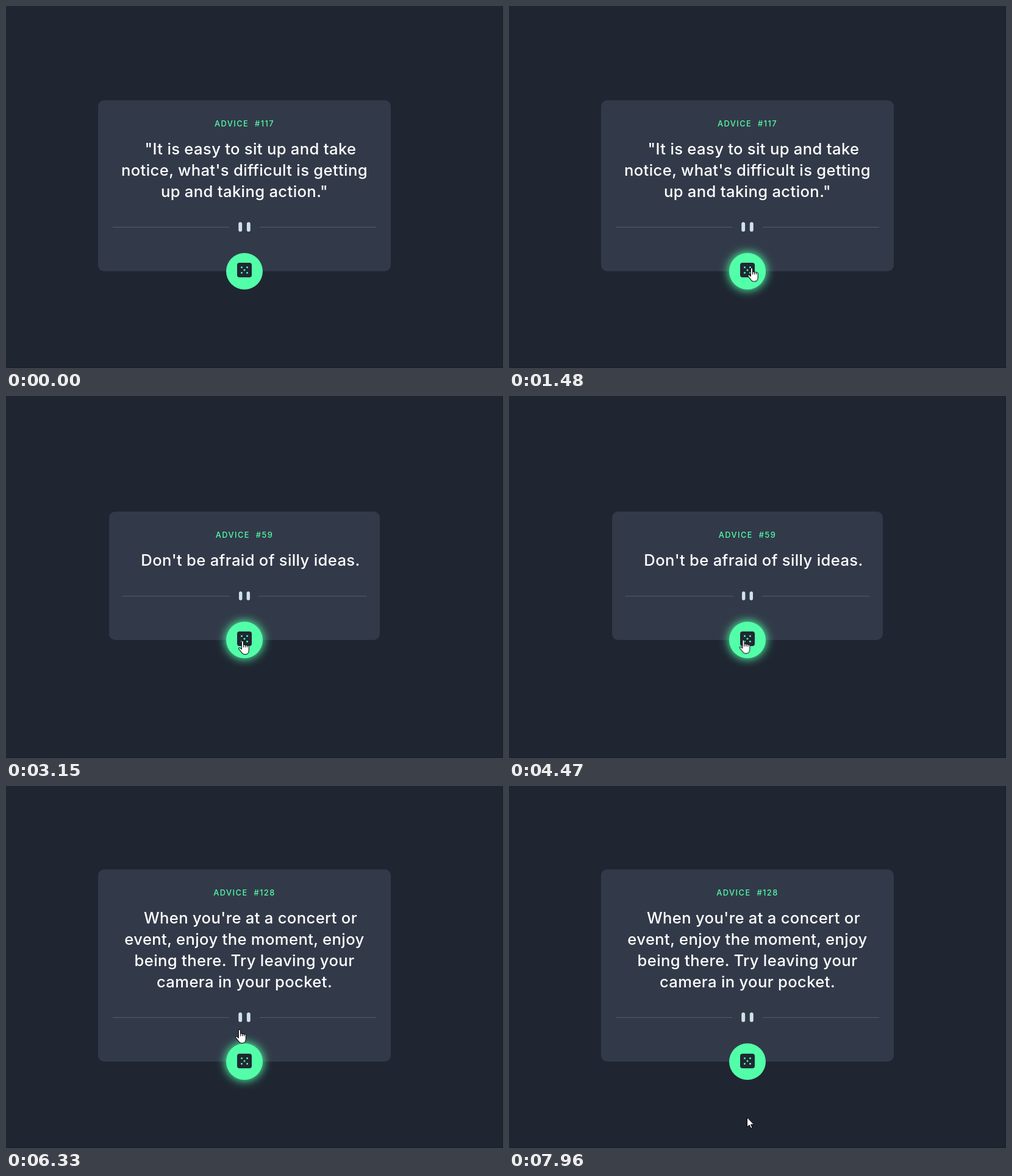
These frames come from a looping animation (815x595 px, 8 s). An HTML page:

```html
<!DOCTYPE html>
<html lang="en">
<head>
<meta charset="utf-8">
<title>Advice generator</title>
<style>
  html, body { margin: 0; width: 100%; height: 100%; overflow: hidden; background: #1f2632; }
  svg { display: block; width: 815px; height: 595px; }
  text { font-family: Inter, "Open Sans", sans-serif; text-anchor: middle; white-space: pre; }
  .title { font-size: 12.8px; font-weight: 500; letter-spacing: 1.45px; word-spacing: 5px; fill: #52ffa8; }
  .quote { font-size: 25.6px; font-weight: 500; letter-spacing: .4px; word-spacing: -.3px; fill: #fff; }
  .panel { fill: #323a49; }

  .card, .btn, .dice, .glow, .click, .arrow, .hand { animation: 8s step-end infinite; }
  .one { animation-name: one; }
  .two { animation-name: two; }
  .three { animation-name: three; }
  .btn { animation-name: btn; }
  .dice { animation-name: dice; }
  .glow { animation-name: hover; fill: #52ffa8; filter: blur(7.5px); }
  .hand { animation-name: hover; }
  .arrow { animation-name: arrow; }
  .click { animation-name: click; fill: #ff0; fill-opacity: .47; }
  .cursor { animation: move 8s linear infinite; }
  .arrow, .hand { fill: #fff; stroke: #000; stroke-linejoin: round; }

  @keyframes one { 0% { visibility: visible } 26.625%, 100% { visibility: hidden } }
  @keyframes two { 0% { visibility: hidden } 26.625% { visibility: visible } 79.125%, 100% { visibility: hidden } }
  @keyframes three { 0% { visibility: hidden } 79.125%, 100% { visibility: visible } }
  @keyframes btn {
    0% { transform: translate(391px, 436px) }
    26.625% { transform: translate(391px, 401px) }
    79.125%, 100% { transform: translate(391px, 453px) }
  }
  @keyframes dice {
    0% { transform: translate(-12px, -14px) }
    79.125%, 100% { transform: translate(-12px, -13px) }
  }
  @keyframes hover { 0% { opacity: 0 } 13.39% { opacity: 1 } 85.75%, 100% { opacity: 0 } }
  @keyframes arrow { 0% { opacity: 1 } 13.39% { opacity: 0 } 85.75%, 100% { opacity: 1 } }
  @keyframes click {
    0%, 18.5%, 44.25%, 73.125%, 100% { opacity: 0 }
    16.75%, 42.625%, 71.5% { opacity: 1 }
  }
  @keyframes move {
    0%, 6.5% { transform: translate(692px, 597px); animation-timing-function: steps(6, start) }
    11.67% { transform: translate(463px, 535px); animation-timing-function: steps(2, start) }
    13.39% { transform: translate(406px, 477px); animation-timing-function: steps(2, start) }
    15.11%, 35.75% { transform: translate(398px, 431px); animation-timing-function: steps(5, start) }
    40.28%, 51.75% { transform: translate(388px, 403px); animation-timing-function: steps(2, start) }
    55%, 55.875% { transform: translate(386px, 402px); animation-timing-function: steps(2, start) }
    59.125%, 85.75% { transform: translate(383px, 401px); animation-timing-function: steps(4, start) }
    89.16% { transform: translate(247px, 399px); animation-timing-function: steps(2, start) }
    90.86% { transform: translate(186px, 430px); animation-timing-function: steps(6, start) }
    96% { transform: translate(234px, 522px); animation-timing-function: steps(5, start) }
    100% { transform: translate(390px, 544px) }
  }
</style>
</head>
<body>
<svg viewBox="0 0 815 595">
  <defs>
    <g id="divider">
      <path fill="#4f5d74" d="M0 8h196v1H0zM248 8h196v1H248z"/>
      <g fill="#cee3e9">
        <rect x="212" width="6" height="16" rx="3"/>
        <rect x="226" width="6" height="16" rx="3"/>
      </g>
    </g>
  </defs>
  <path d="M814.5 0V594.5H0" fill="none" stroke="#191f2a"/>

  <g class="card one">
    <rect class="panel" x="151" y="155" width="480" height="281" rx="10"/>
    <text class="title" x="391" y="198">ADVICE #117</text>
    <g class="quote">
      <text x="401" y="244">"It is easy to sit up and take</text>
      <text x="391" y="279">notice, what's difficult is getting</text>
      <text x="391" y="314">up and taking action."</text>
    </g>
    <use href="#divider" transform="translate(175 355.3) scale(.973)"/>
  </g>

  <g class="card two">
    <rect class="panel" x="169" y="190" width="444" height="211" rx="10"/>
    <text class="title" x="391" y="233">ADVICE #59</text>
    <text class="quote" x="401" y="279">Don't be afraid of silly ideas.</text>
    <use href="#divider" transform="translate(191 321.3) scale(.901)"/>
  </g>

  <g class="card three">
    <rect class="panel" x="151" y="137" width="480" height="316" rx="10"/>
    <text class="title" x="391" y="180">ADVICE #128</text>
    <g class="quote">
      <text x="401" y="226">When you're at a concert or</text>
      <text x="391" y="261">event, enjoy the moment, enjoy</text>
      <text x="391" y="296">being there. Try leaving your</text>
      <text x="391" y="331">camera in your pocket.</text>
    </g>
    <use href="#divider" transform="translate(175 372.3) scale(.973)"/>
  </g>

  <g class="btn">
    <circle class="glow" r="31"/>
    <circle r="30" fill="#52ffa8"/>
    <g class="dice">
      <rect width="24" height="24" rx="4" fill="#202733"/>
      <path d="M7.5 7.5h0M16.5 7.5h0M12 12h0M7.5 16.5h0M16.5 16.5h0" stroke="#52ffa8" stroke-width="3" stroke-linecap="round"/>
    </g>
  </g>

  <g class="cursor">
    <path class="arrow" d="M.5 .8V16.6L4.2 13.2 6.7 18.6 9 17.6 6.6 12.3H11.6Z"/>
    <g class="hand" transform="translate(-7 -1) scale(1.06 1)">
      <path d="M5 2a1.5 1.5 0 0 1 3 0v5.5c.3-1.2 2.6-1 2.8.4.4-1 2.5-.8 2.7.6.5-.8 2.8-.5 2.8 1.1v6.2c0 4.2-2.3 6.9-5.6 6.9-2.6 0-4.3-.9-5.6-3.2L.8 13.8c-.7-1.6 1-2.7 2.2-1.6l2 2Z"/>
      <path d="M8 7.5v3.8M10.8 8v3.3M13.5 8.5v2.8" fill="none"/>
    </g>
    <circle class="click" cx="-1" cy="-1" r="12"/>
  </g>
</svg>
</body>
</html>
```
